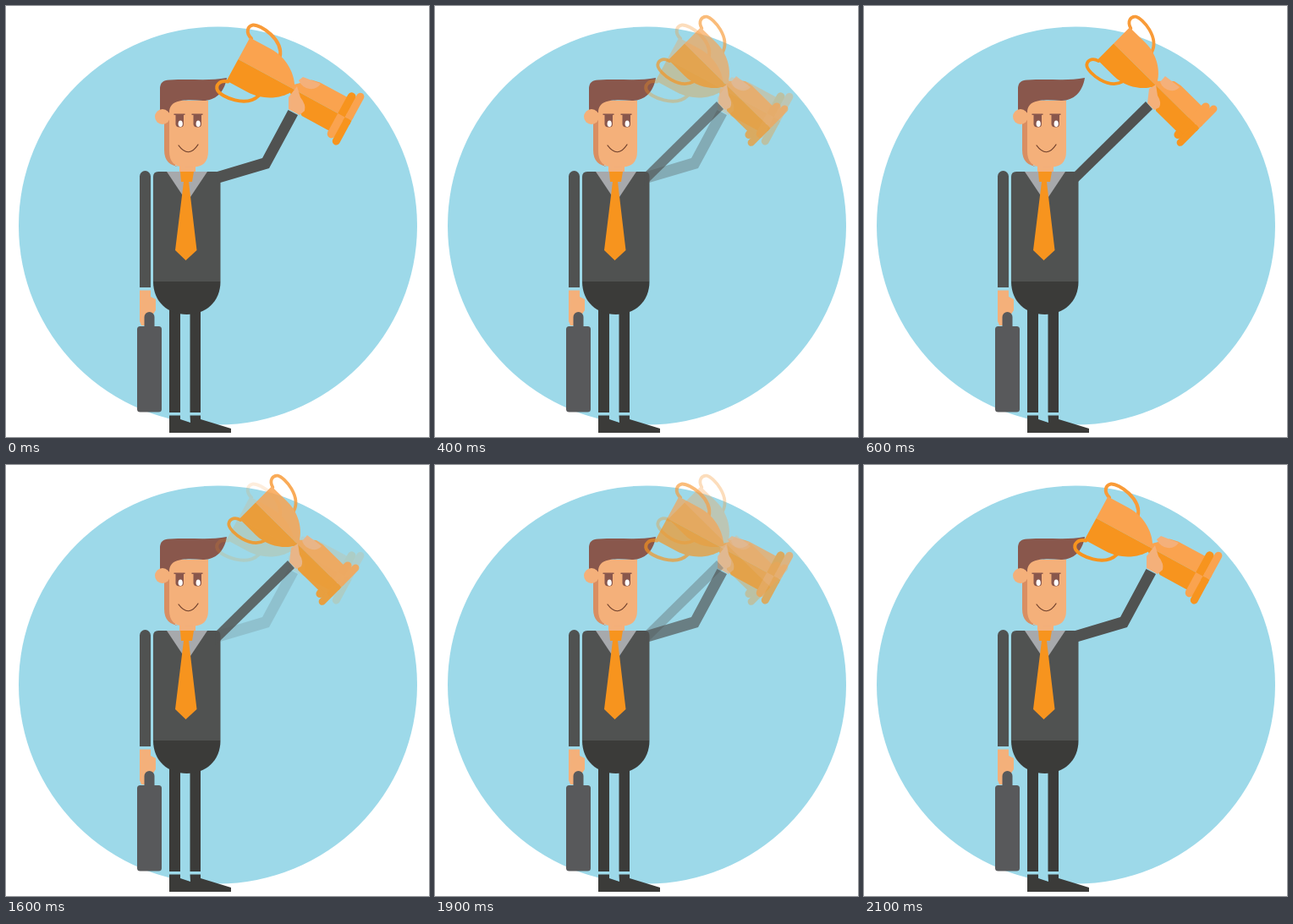
An HTML page that plays this animation: 500x510 px, repeating every 2.2 s.

```html
<!DOCTYPE html>
<html lang="en">
<head>
<meta charset="utf-8">
<title>Winner with trophy</title>
<style>
  html, body { margin: 0; width: 100%; height: 100%; overflow: hidden; background: #fff; }
  svg { display: block; width: 500px; height: 510px; }
  .skin { fill: #f4b07a; }
  .suit { fill: #505251; }
  .dark { fill: #3b3b39; }
  .case { fill: #58595b; }
  .hair { fill: #89574c; }
  .gold { fill: #f7941e; }
  .pale { fill: #faa34f; }
  .line { fill: none; stroke-linecap: round; }
  #low { --plateTop: #f7941e; --plateEnd: #faa34f; }
  #high { --plateTop: #faa34f; --plateEnd: #f7941e; }
</style>
</head>
<body>
<svg viewBox="0 0 500 510">
  <defs>
    <!-- Trophy lying on its axis: rim at x = 0, foot at x = 148 -->
    <g id="trophy">
      <g class="line" stroke-width="4">
        <path stroke="#f99b38" d="M2-29C-8-32-9-40-4-44C4-49 36-46 42-26"/>
        <path stroke="#f7941e" d="M2 29C-8 32-9 40-4 44C4 49 36 46 42 26"/>
      </g>
      <path class="pale" d="M0 0V-29H28C52-29 68-14 73-5V0ZM72 0V-5L88-20L98-22H135V0Z"/>
      <path class="gold" d="M0 0V29H28C52 29 68 14 73 5V0ZM72 0V5L98 23H135V0Z"/>
      <g class="line" stroke-width="10">
        <path stroke="var(--plateTop)" d="M139-25V0"/>
        <path stroke="var(--plateEnd)" d="M139 25V0" stroke-linecap="butt"/>
        <path stroke="var(--plateEnd)" d="M139 25V24"/>
      </g>
      <g class="line" stroke-width="9">
        <path stroke="#faa34f" d="M148-30V-4"/>
        <path stroke="#f7941e" d="M148 30V4"/>
        <path stroke="#faa34f" stroke-linecap="butt" d="M148-5V0"/>
        <path stroke="#f7941e" stroke-linecap="butt" d="M148 5V0"/>
      </g>
    </g>
  </defs>

  <circle cx="250.5" cy="260" r="235.5" fill="#9dd9e9"/>

  <!-- Legs and shoes -->
  <path class="dark" d="M193 355H206V481H193ZM217.5 355H230V481H217.5Z"/>
  <path class="dark" d="M193 484.5H206V489L218 493L217.5 484.5H230V489L266 500V505H193Z"/>

  <!-- Hanging arm and briefcase -->
  <path class="suit" d="M158 333V201.500A6.500 6.500 0 0 1 171 201.500V333Z"/>
  <path class="skin" d="M158 336.500H171V344L177 347V360L173 366V378H160L158 373Z"/>
  <rect class="case" x="163.500" y="362" width="12" height="24" rx="6"/>
  <rect class="case" x="155" y="379" width="29" height="101.500" rx="3.500"/>

  <!-- Torso -->
  <path class="suit" d="M174 326V202Q174 196 180 196H248Q253.500 196 253.500 202V326Z"/>
  <path class="dark" d="M174 326H253.500C253.500 350 236 365 213.700 365S174 350 174 326Z"/>
  <path fill="#a7a9ac" d="M190 196H238L214 232Z"/>
  <path class="skin" d="M205 186H224V196H205Z"/>
  <path class="gold" d="M206 196H222L220 208H216L225.500 289L212.500 301L200 289L210 208H207Z"/>

  <!-- Head -->
  <path fill="#d98e62" d="M187 112H200V190H207Q187 190 187 170Z"/>
  <path class="skin" d="M193 112H239V172Q239 190.500 221 190.500H211Q193 190.500 193 172Z"/>
  <path class="hair" d="M182 126V98Q182 87 194 87.500C220 86 241 89 261 85C258 103 247 112 233 112C215 111 193 109 193 126Z"/>
  <circle class="skin" cx="185" cy="131" r="9"/>
  <g id="eye">
    <path class="hair" d="M198.500 127.500H211.500V129H210V140Q210 143.500 205.500 143.500T200.500 140V129H198.500Z"/>
    <ellipse cx="206.200" cy="139.300" rx="2.600" ry="3.800" fill="#fff"/>
  </g>
  <use href="#eye" x="21"/>
  <path class="line" stroke="#6b3d2a" stroke-width="1.200" d="M204 165Q216 181 227 164"/>

  <!-- Raised arm, bent and stretched -->
  <g id="low">
    <path class="suit" d="M248 196.500L303 180L333.500 123L345 129L311 192L250 210Z"/>
    <use href="#trophy" transform="translate(274.5 63) rotate(28.5)"/>
    <path class="skin" d="M334 108L344 95L348 108Q355 117 353 124L347 129L334 122Z"/>
    <path class="skin" d="M346 88L351 84L372 92Q367 99 359 98Q350 97 346 88Z"/>
  </g>
  <g id="high">
    <path class="suit" d="M247 198L333 113L341 122L248 213Z"/>
    <use href="#trophy" transform="translate(295 44.5) rotate(44.6) scale(.935)"/>
    <path class="skin" d="M337 98L345 93L347 106Q352 114 349 120L343 123L335 115Z"/>
    <path class="skin" d="M350 90L356 83L373 96Q369 101 362 100Q353 98 350 90Z"/>
  </g>
</svg>
<script>
  const low = document.getElementById("low");
  const high = document.getElementById("high");

  // Cross-fade in 100 ms steps: up, hold, down.
  function draw(now) {
    const step = Math.floor(now % 2200 / 100);
    const raised = Math.min(1, step / 6, (21 - step) / 6);
    low.setAttribute("opacity", 1 - raised);
    high.setAttribute("opacity", raised);
    requestAnimationFrame(draw);
  }
  draw(0);
</script>
</body>
</html>
```
